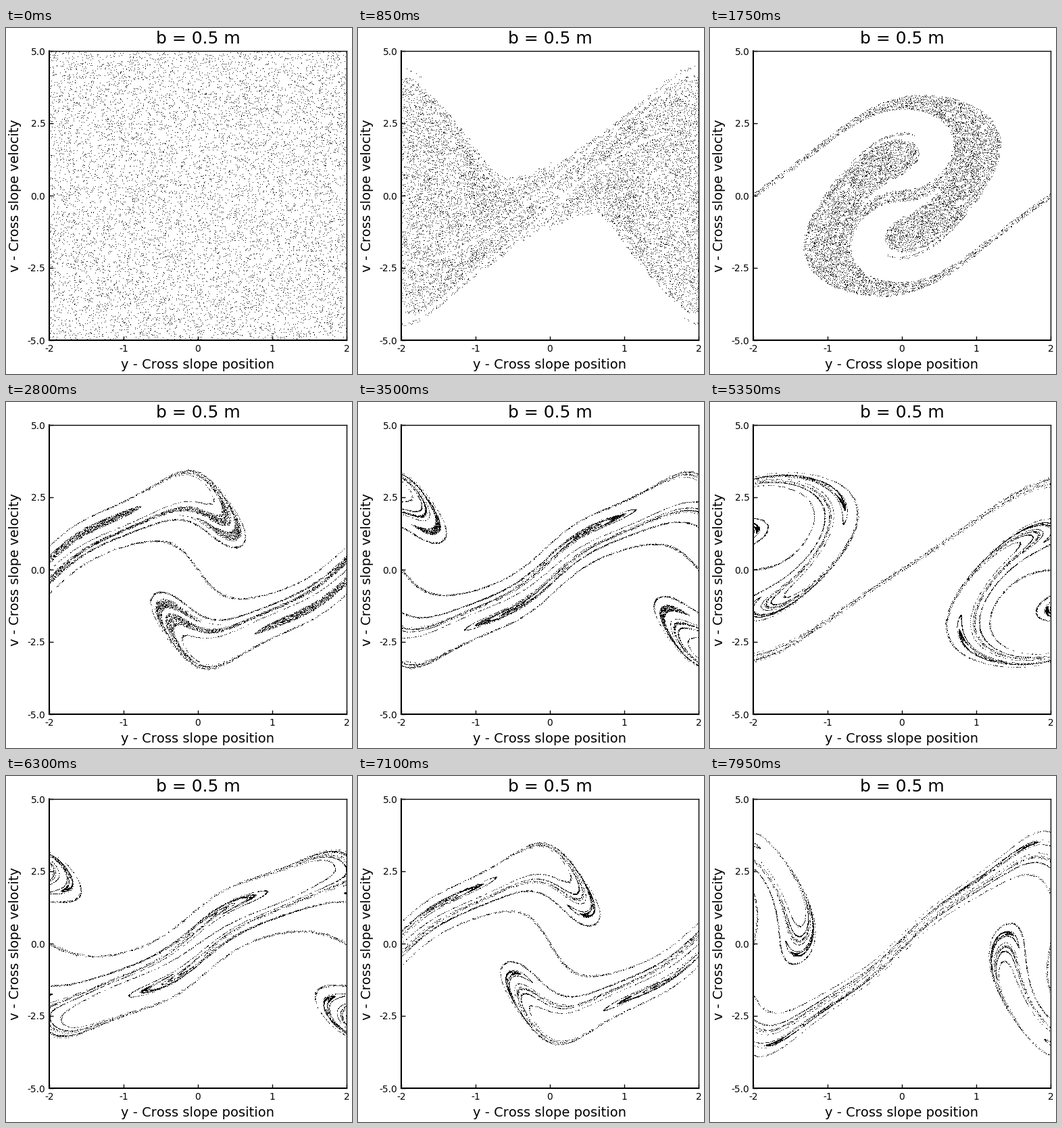
A matplotlib script that plays this animation: 512x512 px, repeating every 8000 ms.

```python
import numpy as np
import matplotlib.pyplot as plt
from matplotlib.animation import FuncAnimation

SIZE, DPI = 512, 100
FRAMES, INTERVAL = 160, 50
DT, SUBSTEPS = 0.1, 5          # model seconds per frame, integration steps
COUNT = 10000

# Slope with moguls: H = -A x - B cos(P x) cos(Q y)
A, B, C, G = 0.25, 0.5, 0.5, 9.81
P, Q = 2 * np.pi / 10, 2 * np.pi / 4
SPEED = 3.5                    # constant downslope speed


def accel(t, y, v):
    cx, sx = np.cos(P * SPEED * t), np.sin(P * SPEED * t)
    cy, sy = np.cos(Q * y), np.sin(Q * y)
    hx = -A + B * P * sx * cy
    hy = B * Q * cx * sy
    hxx = B * P * P * cx * cy
    hxy = -B * P * Q * sx * sy
    hyy = B * Q * Q * cx * cy
    bend = hxx * SPEED ** 2 + 2 * hxy * SPEED * v + hyy * v * v
    force = (G + bend) / (1 + hx * hx + hy * hy)
    return -force * hy - C * v


def rk4(t, y, v, h):
    k1, a1 = v, accel(t, y, v)
    k2 = v + h / 2 * a1
    a2 = accel(t + h / 2, y + h / 2 * k1, k2)
    k3 = v + h / 2 * a2
    a3 = accel(t + h / 2, y + h / 2 * k2, k3)
    k4 = v + h * a3
    a4 = accel(t + h, y + h * k3, k4)
    return (y + h / 6 * (k1 + 2 * k2 + 2 * k3 + k4),
            v + h / 6 * (a1 + 2 * a2 + 2 * a3 + a4))


def simulate():
    rng = np.random.default_rng(7)
    y = rng.uniform(-2, 2, COUNT)
    v = rng.uniform(-5, 5, COUNT)
    h = DT / SUBSTEPS
    states = [(y, v)]
    for i in range(1, FRAMES):
        for j in range(SUBSTEPS):
            y, v = rk4((i - 1) * DT + j * h, y, v, h)
        y = (y + 2) % 4 - 2
        states.append((y, v))
    return states


states = simulate()

plt.rcParams["font.family"] = "DejaVu Sans"
plt.rcParams["text.kerning_factor"] = 6
fig = plt.figure(figsize=(SIZE / DPI, SIZE / DPI), dpi=DPI, facecolor="white")
ax = fig.add_axes([64 / SIZE, 50 / SIZE, 440 / SIZE, 428 / SIZE])
ax.set_xlim(-2, 2)
ax.set_ylim(-5, 5)
ax.set_xticks([-2, -1, 0, 1, 2], ["-2", "-1", "0", "1", "2"])
ax.set_yticks([-5, -2.5, 0, 2.5, 5], ["-5.0", "-2.5", "0.0", "2.5", "5.0"])
ax.tick_params(direction="in", length=4, width=1, pad=4, labelsize=10)
for side, spine in ax.spines.items():
    spine.set_linewidth(1.5 if side in ("left", "bottom") else 1)


def label(x, y, text, size, rotation=0):
    fig.text(x / SIZE, 1 - y / SIZE, text, fontsize=size, rotation=rotation,
             rotation_mode="anchor", ha="center", va="baseline")


label(284, 23, "b = 0.5 m", 18)
label(284, 504, "y - Cross slope position", 14)
label(19, 248, "v - Cross slope velocity", 14, 90)

dots, = ax.plot([], [], "o", color="black", markersize=0.65, markeredgewidth=0)


def update(i):
    dots.set_data(*states[i])
    return dots,


anim = FuncAnimation(fig, update, frames=FRAMES, interval=INTERVAL,
                     init_func=lambda: update(0), repeat=True, repeat_delay=0)
plt.show()
```
